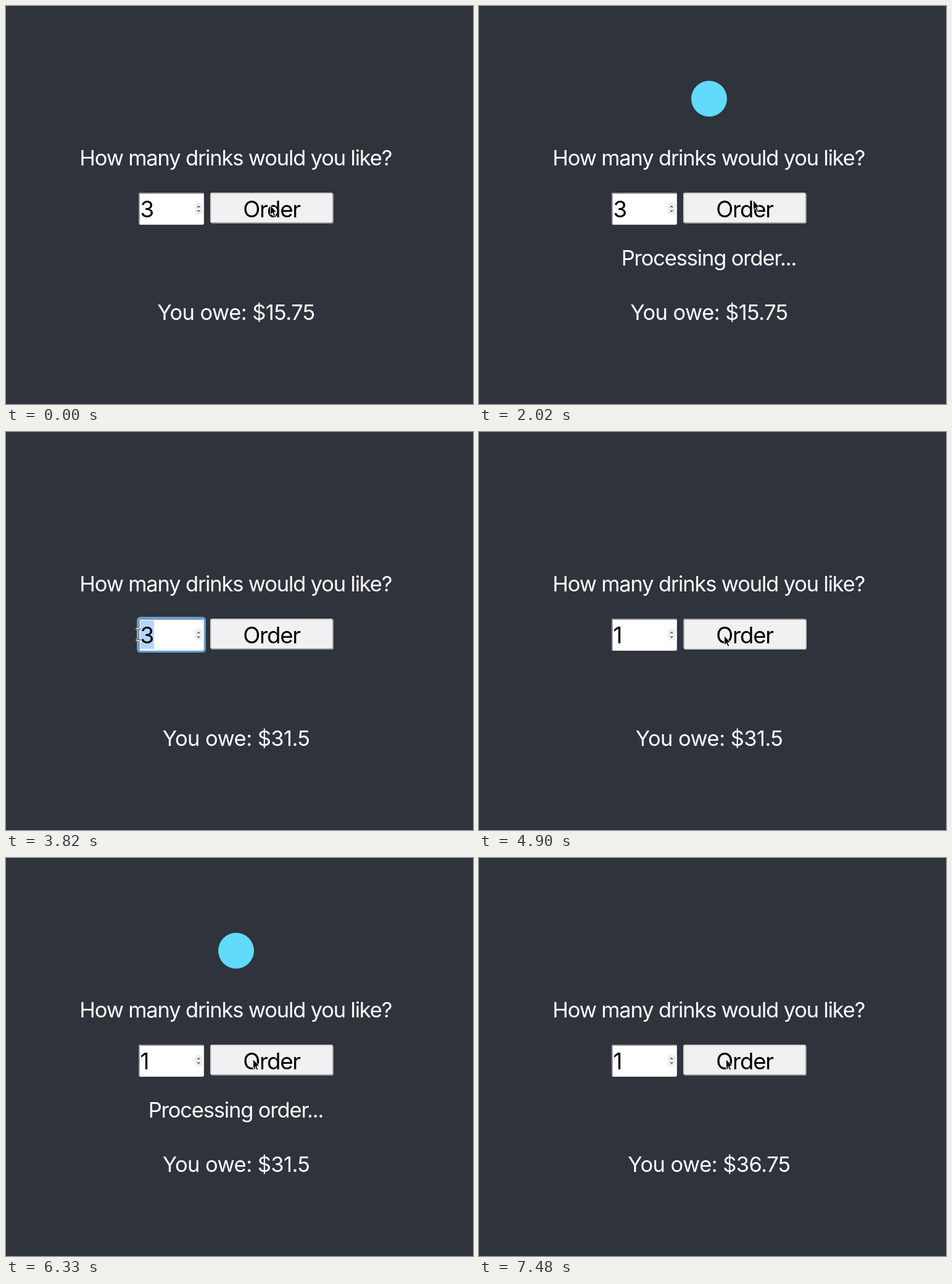
Recreate the animation shown at these times as an HTML page. Size 757x644 px, loop 8 s.

```html
<!DOCTYPE html>
<html lang="en">
<head>
<meta charset="utf-8">
<title>Drink order</title>
<style>
  html, body { margin: 0; width: 100%; height: 100%; overflow: hidden; background: #2f333c; }
  svg { display: block; width: 757px; height: 644px; }
  text {
    font: 34.5px Inter, Roboto, sans-serif;
    font-optical-sizing: none;
    letter-spacing: -.034em;
    text-anchor: middle;
    fill: #fff;
  }
  #total { letter-spacing: -.016em; }
  .control { font-size: 36.7px; fill: #000; }
</style>
</head>
<body>
<svg viewBox="0 0 757 644">
  <circle id="spinner" cx="373" cy="150" r="29" fill="#61dafb"/>
  <text x="372.3" y="258">How many drinks would you like?</text>

  <rect id="ring" x="213.5" y="300.5" width="109" height="55" rx="4" fill="none" stroke="#5e9ed6" stroke-width="3"/>
  <rect x="215" y="302" width="106" height="52" rx="3" fill="#eee"/>
  <path d="M216 353V305q0-2 2-2H320" fill="none" stroke="#9a9a9a" stroke-width="2"/>
  <rect x="217" y="304" width="102" height="48" fill="#fff"/>
  <rect id="selection" x="218" y="305" width="22" height="46" fill="#b4d5fe"/>
  <text id="count" class="control" x="217.5" y="342" style="text-anchor:start"></text>
  <rect x="307.5" y="319.5" width="9.5" height="17" rx="4" fill="#f5f5f5" stroke="#d8d8d8"/>
  <path d="M310.2 326l2-2.4 2 2.4M310.2 330.3l2 2.4 2-2.4" fill="none" stroke="#444" stroke-width="1.2"/>

  <rect x="332" y="303" width="198" height="48" rx="2" fill="#f1f1f1"/>
  <g fill="none" stroke-width="2">
    <path id="edgeTop" d="M332 350V305q0-2 2-2H529"/>
    <path id="edgeBottom" d="M333 351H528q2 0 2-2V304"/>
  </g>
  <text class="control" x="430.5" y="342">Order</text>

  <text id="status" x="372.5" y="420">Processing order...</text>
  <text id="total" x="373" y="508"></text>

  <g id="pointer" stroke="#fff" stroke-linejoin="round">
    <path id="arrow" d="M.5 .5V16L4 12.7 6.4 18.3 8.8 17.3 6.5 11.8H11Z" fill="#000"/>
    <g id="beam" fill="none">
      <path d="M-4-9Q0-9 0-6V6Q0 9-4 9M4-9Q0-9 0-6M0 6Q0 9 4 9" stroke-width="3"/>
      <path d="M-4-9Q0-9 0-6V6Q0 9-4 9M4-9Q0-9 0-6M0 6Q0 9 4 9" stroke="#000"/>
    </g>
  </g>
</svg>
<script>
const LOOP = 8000;
const $ = id => document.getElementById(id);
const between = (t, from, to) => t >= from && t < to;
const show = (id, visible) => $(id).setAttribute('visibility', visible ? 'visible' : 'hidden');

// Pointer path: time, x, y
const path = [
  [0, 428, 322], [590, 428, 322], [1280, 435, 321], [2020, 444, 314],
  [2180, 444, 314], [2700, 325, 332], [3350, 325, 332], [3580, 238, 328],
  [3700, 238, 328], [4110, 125, 327], [4220, 119, 327], [4670, 397, 329],
  [5080, 397, 329], [5400, 400, 325], [LOOP, 400, 325]
];

function pointerAt(t) {
  const i = path.findIndex(key => key[0] > t);
  const [t0, x0, y0] = path[i - 1], [t1, x1, y1] = path[i];
  const u = (t - t0) / (t1 - t0), ease = u * u * (3 - 2 * u);
  return [x0 + (x1 - x0) * ease, y0 + (y1 - y0) * ease];
}

function draw(t) {
  const processing = between(t, 590, 2990) || between(t, 5080, 7480);
  const pressed = between(t, 470, 590) || between(t, 4900, 5080);
  const typing = between(t, 3500, 4180);

  show('spinner', processing);
  show('status', processing);
  show('ring', between(t, 3640, 4900));
  show('selection', between(t, 3780, 4330));
  show('arrow', !typing);
  show('beam', typing);

  $('count').textContent = t < 4330 ? '3' : '1';
  $('total').textContent = 'You owe: $' + (t < 2990 ? '15.75' : t < 7480 ? '31.5' : '36.75');
  $('edgeTop').setAttribute('stroke', pressed ? '#a0a0a0' : '#d0d0d0');
  $('edgeBottom').setAttribute('stroke', pressed ? '#d0d0d0' : '#a0a0a0');
  $('pointer').setAttribute('transform', `translate(${pointerAt(t)})`);
}

const start = performance.now();
function frame() {
  draw((performance.now() - start) % LOOP);
  requestAnimationFrame(frame);
}
frame();
</script>
</body>
</html>
```
